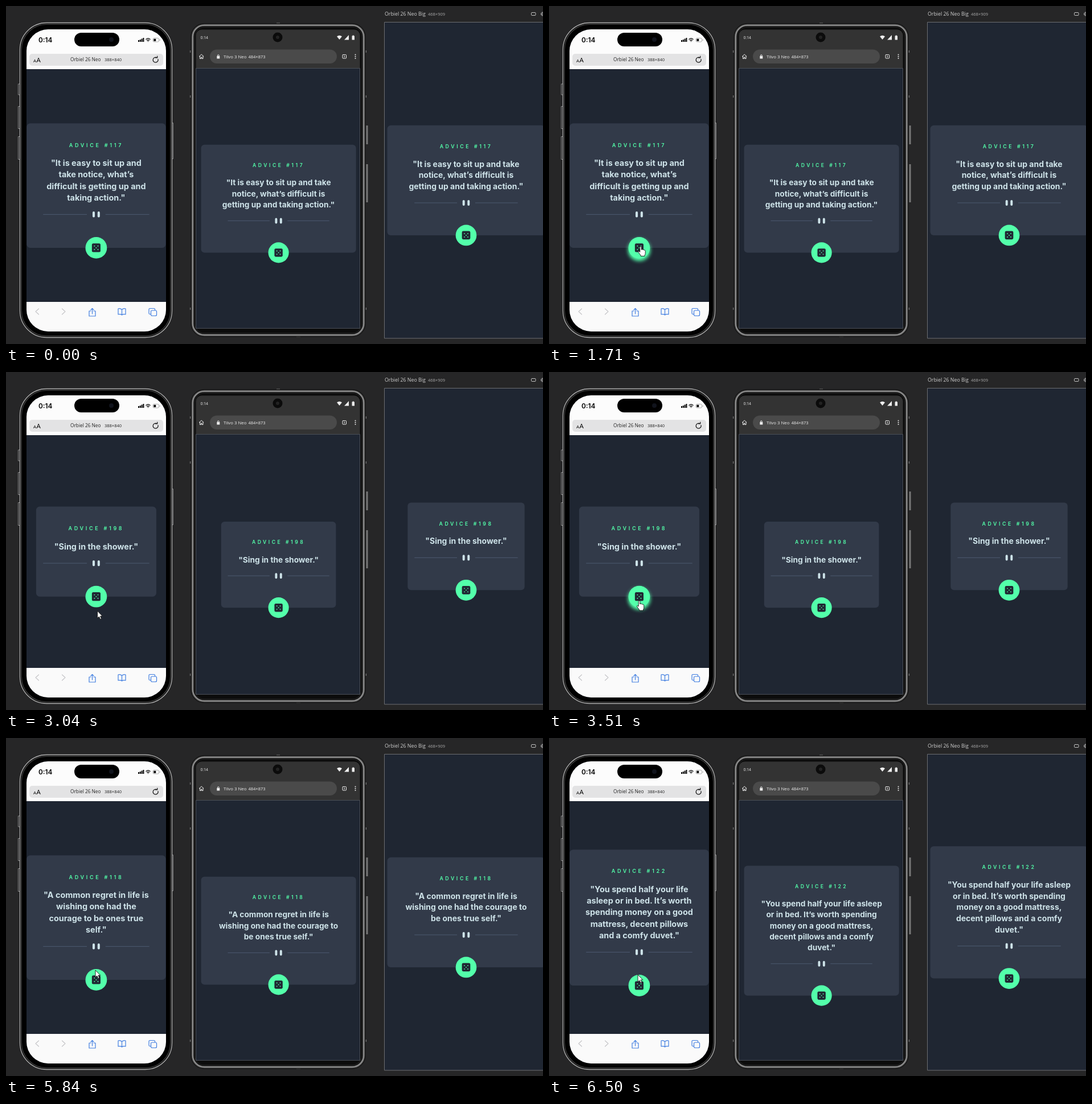
Animation, 943 px wide and 594 px high, one loop 8000 ms. Source, as an HTML page:

```html
<!DOCTYPE html>
<html lang="en">
<head>
<meta charset="utf-8">
<title>Advice cards</title>
<style>
html, body { margin: 0; width: 100%; height: 100%; overflow: hidden; background: #262627; }
svg { display: block; }
text { font-family: "Open Sans", "Noto Sans", sans-serif; }
.line { fill: none; stroke-linecap: round; stroke-linejoin: round; }
.label { font: 600 14.3px Inter, sans-serif; letter-spacing: .41em; fill: #53ffaa; text-anchor: middle; }
.quote { font: 700 22.8px Inter, sans-serif; fill: #cee3e9; text-anchor: middle; }
.size { font-size: 7.5px; }
.glow { filter: blur(5px); }
</style>
</head>
<body>
<svg width="943" height="594" viewBox="0 0 943 594">
  <defs>
    <clipPath id="screen"><rect x="36" y="41" width="245" height="531" rx="38"/></clipPath>
  </defs>

  <!-- left phone -->
  <g fill="#262627" stroke="#8c8c8c">
    <path d="M24 137h-2.500v19h2.500M24 176.500h-2.500v39h2.500M24 229.500h-2.500v40h2.500M292 205.500h1.500v63h-1.500"/>
    <rect x="24.500" y="29.500" width="267" height="553" rx="47" fill="#000" stroke="#b4b4b4" stroke-width="1.300"/>
    <rect x="27" y="32" width="262" height="548" rx="44.500" fill="#000" stroke="#303030" stroke-width="2"/>
  </g>
  <g clip-path="url(#screen)">
    <rect x="36" y="41" width="245" height="531" fill="#1f2632"/>
    <rect x="36" y="41" width="245" height="70" fill="#fcfcfc"/>
    <rect x="36" y="520" width="245" height="52" fill="#fafafa"/>
  </g>
  <rect x="41" y="84" width="235" height="21" rx="5" fill="#e3e3e4"/>
  <rect x="120" y="47" width="79" height="24" rx="12"/>
  <circle cx="185" cy="59" r="4" fill="#10131c"/>
  <text x="57" y="63.500" font-size="11.800" style="font-family:Inter,sans-serif;font-weight:600">0:14</text>
  <path d="M232 60h2v3h-2zM234.800 59h2v4h-2zM237.600 57.500h2v5.500h-2zM240.400 56h2v7h-2z"/>
  <g class="line" stroke="#111" stroke-width="1.400">
    <path d="M246 58.500q3.500-3 7 0M247.700 60.500q1.800-1.500 3.600 0M249.500 62.300v.1"/>
    <rect x="258" y="56.500" width="10.500" height="6.500" rx="2" stroke="#aaa" stroke-width="1"/>
    <path d="M270.300 59v1.500" stroke="#aaa" stroke-width="1"/>
    <path d="M267 93.500a4.500 4.500 0 1 1-2-2.700M262.500 91h3.200v-3" stroke-width="1.200"/>
  </g>
  <rect x="259.300" y="57.800" width="4" height="4" rx="1"/>
  <text x="48" y="99" font-size="8">A</text><text x="53.500" y="99" font-size="11.500">A</text>
  <text x="113" y="97" font-size="8.300" fill="#222">Orbiel 26 Neo</text>
  <text class="size" x="173" y="97" fill="#222">388×840</text>
  <g class="line" stroke="#3f7de0" stroke-width="1.200">
    <path d="M57.500 532l-5.500 5 5.500 5M98.500 532l5.500 5-5.500 5" stroke="#c6c6c9"/>
    <path d="M149 536h-3v9h11v-9h-3M151.500 541v-9.500m-2.700 2.700l2.700-2.700 2.700 2.700"/>
    <path d="M203.500 533.500q-3-2.500-6.500-1.500v10q4-1 6.500 1 2.500-2 6.500-1v-10q-3.500-1-6.500 1.500v9.500"/>
    <rect x="254.500" y="535" width="10" height="9.500" rx="2"/>
    <path d="M254 541.500h-1.500q-1.500 0-1.500-1.500v-7q0-1.500 1.500-1.500h7.500q1.500 0 1.500 1.500v1.500"/>
  </g>

  <!-- middle phone -->
  <path d="M634 210v33M634 278v67" stroke="#777" stroke-width="3"/>
  <path d="M324 78v4M324 157v4M632 78v4M632 157v4M324 530v4M632 530v4M475 30.500h6M510 581h7" stroke="#777" stroke-width="2"/>
  <rect x="325" y="31" width="306" height="550" rx="23" fill="#4c4c4c" stroke="#161616" stroke-width="1.500"/>
  <rect x="328" y="34" width="300" height="544" rx="20" fill="#0c0c0c" stroke="#8a8a8a" stroke-width="2.500"/>
  <rect x="331" y="37" width="294" height="538" rx="17" fill="#0c0c0c" stroke="#2c2c2c"/>
  <rect x="333.500" y="41.500" width="288" height="525" rx="10" fill="#333"/>
  <path d="M333.500 109.500h288v457h-288z" fill="#1f2632" stroke="#4a4f57"/>
  <circle cx="477" cy="55" r="8.500" fill="#0b0b0b"/><circle cx="477" cy="55" r="3" fill="#222"/>
  <rect x="358" y="76.500" width="223" height="24.500" rx="12.250" fill="#4a4a4a"/>
  <g fill="#eee">
    <text x="341.500" y="57.700" font-size="6.800">0:14</text>
    <path d="M581 53.500q4.500-3.500 9 0l-4.500 5.500zM602 51v8.500h-8zM607.500 52.500h1.200v-1h2v1h1.300v7h-4.500z"/>
    <path d="M370.300 88h5v4.500h-5z"/>
    <text x="382" y="91.700" font-size="7.800">Tilvo 3 Neo</text>
    <text class="size" x="425.500" y="91.700">484×873</text>
    <circle cx="613.500" cy="85.500" r="1"/><circle cx="613.500" cy="88.800" r="1"/><circle cx="613.500" cy="92" r="1"/>
  </g>
  <g class="line" stroke="#eee">
    <path d="M339.500 88.500l3.700-3.500 3.700 3.500M340.500 88v4.500h2v-2.500h1.500v2.500h2v-4.500"/>
    <path d="M371.500 88v-1a1.300 1.300 0 0 1 2.600 0v1"/>
    <rect x="591" y="85.500" width="6.500" height="6.500" rx="1"/><path d="M594.300 87.500v2.500"/>
  </g>

  <!-- right device -->
  <path d="M664.500 28.500h287v555.500h-287z" fill="#1f2632" stroke="#6c6e72"/>
  <g fill="#cfcfcf">
    <text x="665" y="17.300" font-size="8.800">Orbiel 26 Neo Big</text>
    <text class="size" x="741" y="17.300" fill="#aaa">468×909</text>
  </g>
  <g class="line" stroke="#c4c4c4">
    <rect x="922.500" y="11.500" width="7.500" height="5" rx="1"/>
    <circle cx="942.500" cy="14" r="3" stroke-dasharray="1.500 1"/><circle cx="942.500" cy="14" r="1.500"/>
  </g>

  <g id="cards"></g>
  <g id="cursor" stroke="#111" stroke-width=".9" stroke-linejoin="round" fill="#fff">
    <path id="arrow" d="M0 0v12.500l2.900-2.500 2 4.500 2.100-.9-2-4.500h3.800z"/>
    <path id="hand" d="M-1.300 9V1.300a1.300 1.300 0 0 1 2.600 0V6q.3-1 1.400-.9 1 .1 1.100 1 .4-.7 1.300-.5 1 .2 1 1.200.5-.5 1.200-.2.900.3.900 1.300v4q0 2.100-1.200 3.600v1.600H.1v-1.400Q-1.300 14-4 10.200q-.6-1.200.3-1.600.9-.3 2.400 1.400z"/>
  </g>
</svg>
<script>
const $ = id => document.getElementById(id);
const LOOP = 8000;

// centre of each screen, scale of its page, page width
const devices = [
  { x: 158.4, y: 315.6, u: .63, w: 388 },
  { x: 478.6, y: 338.6, u: .602, w: 484 },
  { x: 808, y: 306.4, u: .613, w: 468 }
];

// slash = line break; the first wrapping is for the narrowest device
const advice = [
  { from: 0, id: 117, wide: 452,
    narrow: '"It is easy to sit up and/take notice, what’s/difficult is getting up and/taking action."',
    broad: '"It is easy to sit up and take/notice, what’s difficult is/getting up and taking action."' },
  { from: 2440, id: 198, wide: 335,
    narrow: '"Sing in the shower."', broad: '"Sing in the shower."' },
  { from: 3770, id: 118, wide: 452,
    narrow: '"A common regret in life is/wishing one had the/courage to be ones true/self."',
    broad: '"A common regret in life is/wishing one had the courage to/be ones true self."' },
  { from: 6500, id: 122, wide: 452,
    narrow: '"You spend half your life/asleep or in bed. It’s worth/spending money on a good/mattress, decent pillows/and a comfy duvet."',
    broad: '"You spend half your life asleep/or in bed. It’s worth spending/money on a good mattress,/decent pillows and a comfy/duvet."' }
];

const dots = [[-4.9, -4.9], [4.9, -4.9], [0, 0], [-4.9, 4.9], [4.9, 4.9]]
  .map(([x, y]) => `<circle cx="${x}" cy="${y}" r="1.5" fill="#53ffaa"/>`).join('');

function card(device, item, narrow, hover) {
  const lines = (narrow ? item.narrow : item.broad).split('/');
  const w = Math.min(item.wide, device.w), h = 219 + 32 * lines.length;
  const quote = lines.map((s, i) => `<text class="quote" y="${119 + 32 * i}">${s}</text>`).join('');
  return `<g transform="translate(${device.x} ${device.y}) scale(${device.u}) translate(0 ${-h / 2})">
    <rect x="${-w / 2}" width="${w}" height="${h}" rx="10" fill="#323a49"/>
    <text class="label" y="65.500">ADVICE #${item.id}</text>${quote}
    <g transform="translate(0 ${h - 93})">
      <path d="M-148 0h122M26 0h122" stroke="#4f5d74" stroke-width="1.500"/>
      <path d="M-7-5v10M7-5v10" stroke="#cee3e9" stroke-width="6.500" stroke-linecap="round"/>
    </g>
    <g transform="translate(0 ${h})">
      ${hover ? '<circle class="glow" cy="6" r="31" fill="#53ffaa"/>' : ''}
      <circle r="30" fill="#53ffaa"/>
      <rect x="-12" y="-12" width="24" height="24" rx="4" fill="#202733"/>${dots}
    </g></g>`;
}

const mix = (a, b, p) => a + (b - a) * p;
const step = (t, start, end, n) => Math.floor((t - start) / (end - start) * n + 1e-6) / n;

// pointer tip and whether it is over the button
function pointer(t) {
  if (t < 390) return null;
  if (t < 1170) {
    const p = step(t, 390, 1170, 11), q = 1 - p;
    return [817 * q * q + 860 * p * q + 163 * p * p, 585 * q * q + 220 * p * q + 421 * p * p, false];
  }
  if (t < 1220) return [163, 421.5, true];
  if (t < 2440) return [161, 422.5, true];
  if (t < 2970) return [161, 423, false];
  if (t < 3510) {
    const p = (step(t, 2970, 3510, 6) * 6 + 1) / 7, y = mix(423, 402, p);
    return [mix(161, 158, p), y, y < 413];
  }
  if (t < 3770) return [158.5, 402, true];
  if (t < 5840) return [158.5, 402, false];
  if (t < 5900) return [157, 408, false];
  if (t < 6100) return [155, 407.5, true];
  if (t < 6170) return [152, 407.5, true];
  if (t < 6500) return [154, 407.5, true];
  return [156, 416, false];
}

let shown = '';
function draw(now) {
  const t = now % LOOP;
  const item = advice.filter(a => a.from <= t).pop();
  const tip = pointer(t), hover = !!tip && tip[2];
  const key = item.id + ' ' + hover;
  if (key !== shown) {
    $('cards').innerHTML = devices.map((d, i) => card(d, item, i === 0, hover && i === 0)).join('');
    shown = key;
  }
  $('cursor').style.display = tip ? '' : 'none';
  if (tip) $('cursor').setAttribute('transform', `translate(${tip[0]} ${tip[1]})`);
  $('arrow').style.display = hover ? 'none' : '';
  $('hand').style.display = hover ? '' : 'none';
}

const start = performance.now();
function tick() {
  draw(performance.now() - start);
  requestAnimationFrame(tick);
}
tick();
</script>
</body>
</html>
```
